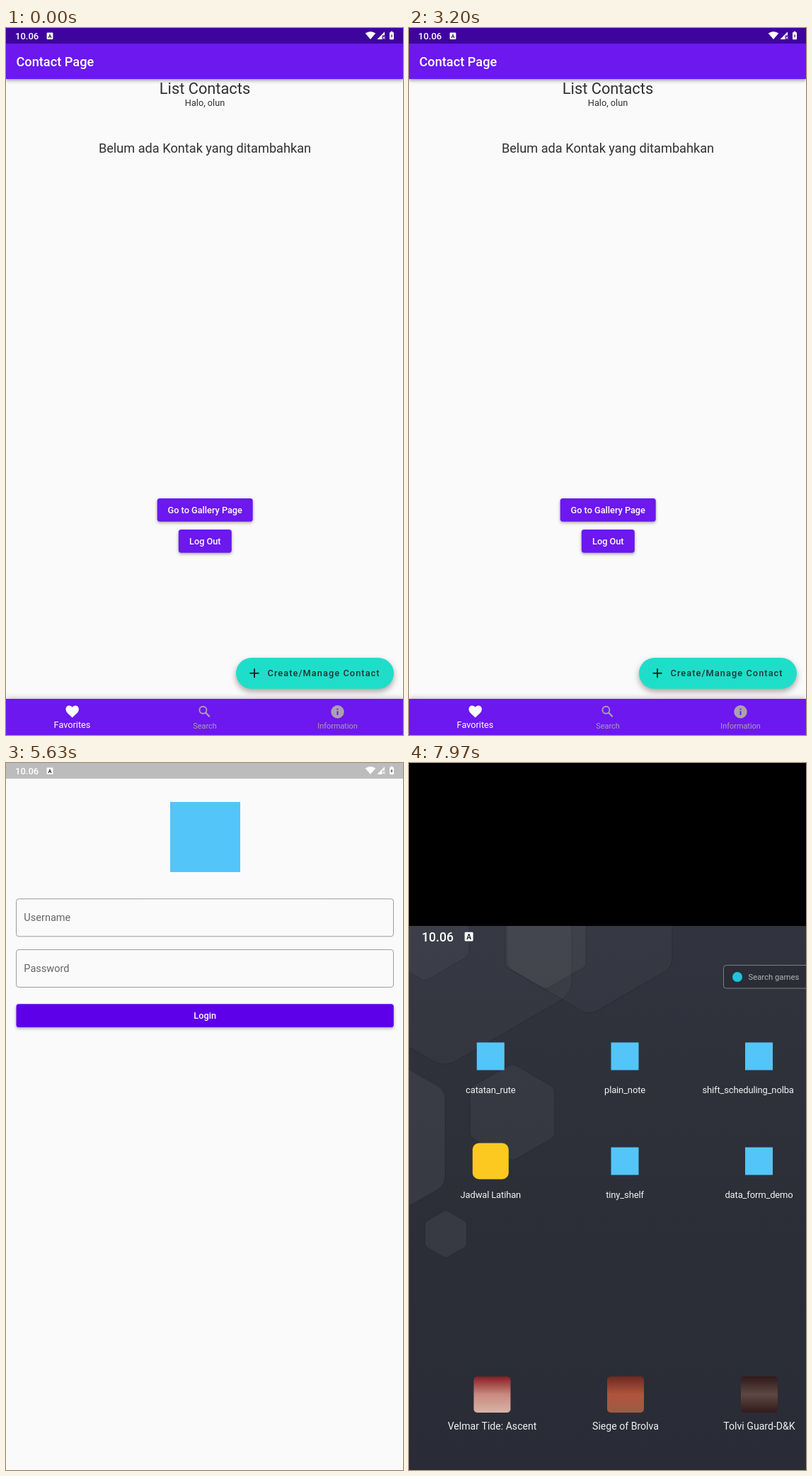
Animation of 561 by 998 pixels, one loop 8000 ms. Source, as an HTML page with a canvas:

```html
<!DOCTYPE html>
<html lang="id">
<head>
<meta charset="utf-8">
<title>Contact app</title>
<style>
  html, body { margin: 0; width: 100%; height: 100%; overflow: hidden; background: #000; }
  canvas { display: block; width: 561px; height: 998px; }
</style>
</head>
<body>
<canvas id="stage"></canvas>
<script>
const W = 561, H = 998, LOOP = 8000;
const PUSH_START = 3723, PUSH_TIME = 300;
const CLOSE_AT = 6800, HOME_START = 6900, HOME_TIME = 150;
const PURPLE = '#6c18ee', PAPER = '#fafafb', INK = '#303030', GREY = '#aca2ac';

const canvas = document.getElementById('stage');
const ctx = canvas.getContext('2d');
const dpr = window.devicePixelRatio || 1;
canvas.width = W * dpr;
canvas.height = H * dpr;

const clamp = v => Math.max(0, Math.min(1, v));
const ramp = (v, from, to) => clamp((v - from) / (to - from));

function bezier(x, x1, y1, x2, y2) {
  const at = (u, a, b) => 3 * (1 - u) * (1 - u) * u * a + 3 * (1 - u) * u * u * b + u * u * u;
  let lo = 0, hi = 1;
  for (let i = 0; i < 24; i++) {
    const mid = (lo + hi) / 2;
    if (at(mid, x1, x2) < x) lo = mid; else hi = mid;
  }
  return at(lo, y1, y2);
}

// Two-part easing of the zoom page transition
function zoomEase(p) {
  if (p < 0.4) return bezier(p / 0.4, 0.05, 0, 0.1333, 0.06) / 6;
  return 1 / 6 + 5 / 6 * bezier((p - 0.4) / 0.6, 0.2083, 0.82, 0.25, 1);
}

function text(str, x, y, size, color, { weight = 400, align = 'center', spacing = 0 } = {}) {
  ctx.font = `${weight} ${size}px Roboto, sans-serif`;
  ctx.letterSpacing = spacing + 'px';
  ctx.textAlign = align;
  ctx.fillStyle = color;
  ctx.fillText(str, x, y);
}

function rect(x, y, w, h, color) {
  ctx.fillStyle = color;
  ctx.fillRect(x, y, w, h);
}

function roundRect(x, y, w, h, r, color) {
  ctx.beginPath();
  ctx.roundRect(x, y, w, h, r);
  ctx.fillStyle = color;
  ctx.fill();
}

function circle(x, y, r, color) {
  ctx.beginPath();
  ctx.arc(x, y, r, 0, Math.PI * 2);
  ctx.fillStyle = color;
  ctx.fill();
}

function polygon(points, color) {
  ctx.beginPath();
  points.forEach(([x, y]) => ctx.lineTo(x, y));
  ctx.closePath();
  ctx.fillStyle = color;
  ctx.fill();
}

function line(x1, y1, x2, y2, width, color) {
  ctx.beginPath();
  ctx.moveTo(x1, y1);
  ctx.lineTo(x2, y2);
  ctx.lineWidth = width;
  ctx.strokeStyle = color;
  ctx.stroke();
}

function withShadow(blur, dy, alpha, draw) {
  ctx.save();
  ctx.shadowColor = `rgba(0,0,0,${alpha})`;
  ctx.shadowBlur = blur * dpr;
  ctx.shadowOffsetY = dy * dpr;
  draw();
  ctx.restore();
}

function zoomed(scale, draw) {
  ctx.save();
  ctx.translate(W / 2, H / 2);
  ctx.scale(scale, scale);
  ctx.translate(-W / 2, -H / 2);
  draw();
  ctx.restore();
}

function button(label, x, y, w, h, color) {
  withShadow(4, 1.8, 0.35, () => roundRect(x, y, w, h, 3.6, color));
  text(label, x + w / 2, y + h / 2 + 4.5, 12.73, '#fff', { weight: 500 });
}

function clock(x, y, scale) {
  ctx.save();
  ctx.translate(x, y);
  ctx.scale(scale, scale);
  text('10.06', 0, 0, 13, '#fff', { weight: 500, align: 'left' });
  roundRect(44.6, -9.8, 8.8, 9.4, 1, '#fff');
  text('A', 49, -2.3, 7.5, '#222', { weight: 700 });
  ctx.restore();
}

function statusBar() {
  rect(0, 0, W, 22, 'rgba(0,0,0,0.25)');
  clock(13, 16.3, 1);
  ctx.beginPath();
  ctx.moveTo(515, 16);
  ctx.lineTo(507.7, 7.5);
  ctx.quadraticCurveTo(515, 2.3, 522.3, 7.5);
  ctx.closePath();
  ctx.fillStyle = '#fff';
  ctx.fill();
  polygon([[524.5, 16], [535, 5.3], [535, 10.5], [531.5, 10.5], [531.5, 16]], '#fff');
  line(532.5, 12, 535.5, 15.5, 1, '#fff');
  line(535.5, 12, 532.5, 15.5, 1, '#fff');
  roundRect(542, 6, 6, 10.3, 1, '#fff');
  rect(543.7, 4.7, 2.6, 2, '#fff');
  polygon([[545.5, 8], [543.3, 11.8], [544.7, 11.8], [544.5, 14.4], [546.7, 10.6], [545.3, 10.6]], '#555');
}

function heart(cx, cy) {
  ctx.beginPath();
  ctx.moveTo(cx, cy + 8.5);
  for (const side of [-1, 1]) {
    ctx.moveTo(cx, cy + 8.5);
    ctx.bezierCurveTo(cx + side * 6, cy + 3, cx + side * 9.2, cy + 0.5, cx + side * 9.2, cy - 3.2);
    ctx.bezierCurveTo(cx + side * 9.2, cy - 9, cx + side * 3, cy - 10, cx, cy - 6.3);
  }
  ctx.fillStyle = '#fff';
  ctx.fill();
}

function bottomNav() {
  withShadow(7, -1, 0.25, () => rect(0, 947, W, 51, PURPLE));
  heart(93.7, 965);
  text('Favorites', 93.5, 988, 12.73, '#fff');

  ctx.beginPath();
  ctx.arc(278.4, 962.8, 5, 0, Math.PI * 2);
  ctx.lineWidth = 1.9;
  ctx.strokeStyle = GREY;
  ctx.stroke();
  line(282, 966.4, 287.8, 972.2, 2.2, GREY);
  text('Search', 281, 988.5, 10.9, GREY);

  circle(468.5, 965.2, 9.2, GREY);
  rect(467.5, 960.6, 2, 1.9, PURPLE);
  rect(467.5, 964.3, 2, 5.5, PURPLE);
  text('Information', 468.5, 988.5, 10.9, GREY);
}

function contactPage() {
  rect(0, 0, W, H, PAPER);
  withShadow(5, 2, 0.4, () => rect(0, 0, W, 72, PURPLE));
  rect(0, 0, W, 22, '#5405d2');
  text('Contact Page', 14.5, 54, 18.18, '#fff', { weight: 500, align: 'left' });

  text('List Contacts', 281, 93, 21.8, INK);
  text('Halo, olun', 281, 110, 12.73, INK);
  text('Belum ada Kontak yang ditambahkan', 281, 176, 18.18, INK);

  button('Go to Gallery Page', 213.7, 664, 135, 32.7, PURPLE);
  button('Log Out', 243.8, 708, 75, 32.7, PURPLE);

  withShadow(9, 4, 0.35, () => roundRect(325, 889, 223, 43.7, 21.8, '#1edeca'));
  line(344.5, 910.8, 357.5, 910.8, 1.9, '#222');
  line(351, 904.3, 351, 917.3, 1.9, '#222');
  text('Create/Manage Contact', 369.5, 915.3, 12.73, '#26302f',
    { weight: 500, align: 'left', spacing: 1.09 });

  bottomNav();
}

function field(label, y) {
  ctx.beginPath();
  ctx.roundRect(14.5, y, 533, 53, 3.6);
  ctx.lineWidth = 1;
  ctx.strokeStyle = '#9c9c9e';
  ctx.stroke();
  text(label, 25.3, y + 31, 14.55, '#666', { align: 'left' });
}

function loginPage() {
  rect(0, 0, W, H, PAPER);
  rect(232, 55, 99, 99, '#54c5f8');
  field('Username', 191.8);
  field('Password', 263.5);
  button('Login', 14.5, 340.3, 533.3, 32.7, '#5d00e9');
}

function hexagon(cx, cy, r, alpha) {
  const corners = Array.from({ length: 6 }, (_, i) => {
    const a = Math.PI / 6 + i * Math.PI / 3;
    return [cx + r * Math.cos(a), cy + r * Math.sin(a)];
  });
  const [last, first] = [corners[5], corners[0]];
  ctx.beginPath();
  ctx.moveTo((last[0] + first[0]) / 2, (last[1] + first[1]) / 2);
  corners.forEach((c, i) => {
    const next = corners[(i + 1) % 6];
    ctx.arcTo(c[0], c[1], next[0], next[1], r * 0.16);
  });
  ctx.closePath();
  ctx.fillStyle = `rgba(255,255,255,${alpha})`;
  ctx.fill();
  ctx.lineWidth = 1.5;
  ctx.strokeStyle = 'rgba(10,12,20,0.12)';
  ctx.stroke();
}

function vertical(y, h, ...colors) {
  const g = ctx.createLinearGradient(0, y, 0, y + h);
  colors.forEach((c, i) => g.addColorStop(i / (colors.length - 1), c));
  return g;
}

function appIcon(label, cx, y, color) {
  if (color) roundRect(cx - 25.5, y - 25.5, 51, 51, 9, color);
  else rect(cx - 19.5, y - 19.5, 39, 39, '#54c5f8');
  text(label, cx, y + 51.5, 13, '#f2f2f2', { spacing: -0.15 });
}

function gameIcon(label, cx, labelX, ...colors) {
  roundRect(cx - 26, 866, 52, 51, 5, vertical(866, 51, ...colors));
  text(label, labelX, 941.3, 14.1, '#f0f0f0');
}

function homeScreen() {
  ctx.save();
  ctx.beginPath();
  ctx.rect(0, 230, W, H - 230);
  ctx.clip();
  rect(0, 230, W, H - 230, vertical(230, H - 230, '#31343e', '#2c2f38', '#292c36'));

  hexagon(50, 222, 208, 0.022);
  hexagon(255, 221, 135, 0.025);
  hexagon(22, 235, 73, 0.03);
  hexagon(193, 254, 66, 0.04);
  hexagon(-65, 529, 134, 0.05);
  hexagon(146, 493, 69, 0.04);
  hexagon(52, 665, 34, 0.055);

  ctx.beginPath();
  ctx.roundRect(444.5, 285.5, 160, 32.5, 4);
  ctx.fillStyle = 'rgba(0,0,0,0.12)';
  ctx.fill();
  ctx.lineWidth = 1;
  ctx.strokeStyle = 'rgba(255,255,255,0.38)';
  ctx.stroke();
  circle(464, 302, 7, '#21c3dc');
  text('Search games', 479.5, 305.8, 11.3, '#b2b4ba', { align: 'left' });

  appIcon('catatan_rute', 115.3, 414);
  appIcon('plain_note', 305, 414);
  rect(475, 394.5, 39, 39, '#54c5f8');
  text('shift_scheduling_nolba', 414.5, 465.5, 13, '#f2f2f2', { align: 'left', spacing: -0.15 });
  appIcon('Jadwal Latihan', 115.3, 562, '#fbc91f');
  appIcon('tiny_shelf', 305, 562);
  appIcon('data_form_demo', 494.5, 562);

  gameIcon('Velmar Tide: Ascent', 117.5, 117.5, '#861d22', '#c98a80', '#d9b3a6');
  gameIcon('Siege of Brolva', 306, 306, '#6e2a22', '#b0543e', '#9c5b45');
  gameIcon('Tolvi Guard-D&K', 495, 495, '#32191a', '#5d4843', '#33191a');
  ctx.restore();
}

function pushTransition(t) {
  const p = clamp((t - PUSH_START) / PUSH_TIME);
  const e = zoomEase(p);
  if (p < 1) {
    zoomed(1 + 0.05 * e, contactPage);
    rect(0, 0, W, H, `rgba(0,0,0,${0.6 * ramp(p, 0.2075, 0.4175)})`);
  }
  ctx.globalAlpha = ramp(p, 0.125, 0.25);
  if (ctx.globalAlpha > 0) zoomed(0.85 + 0.15 * e, loginPage);
  ctx.globalAlpha = 1;
}

function render(t) {
  ctx.setTransform(dpr, 0, 0, dpr, 0, 0);
  rect(0, 0, W, H, '#000');
  if (t < CLOSE_AT) {
    if (t < PUSH_START) contactPage();
    else pushTransition(t);
    statusBar();
    return;
  }
  ctx.globalAlpha = clamp((t - HOME_START) / HOME_TIME);
  if (ctx.globalAlpha > 0) homeScreen();
  ctx.globalAlpha = 1;
  clock(18, 252, 1.36);
}

const start = performance.now();
function tick() {
  render((performance.now() - start) % LOOP);
  requestAnimationFrame(tick);
}
tick();
</script>
</body>
</html>
```
